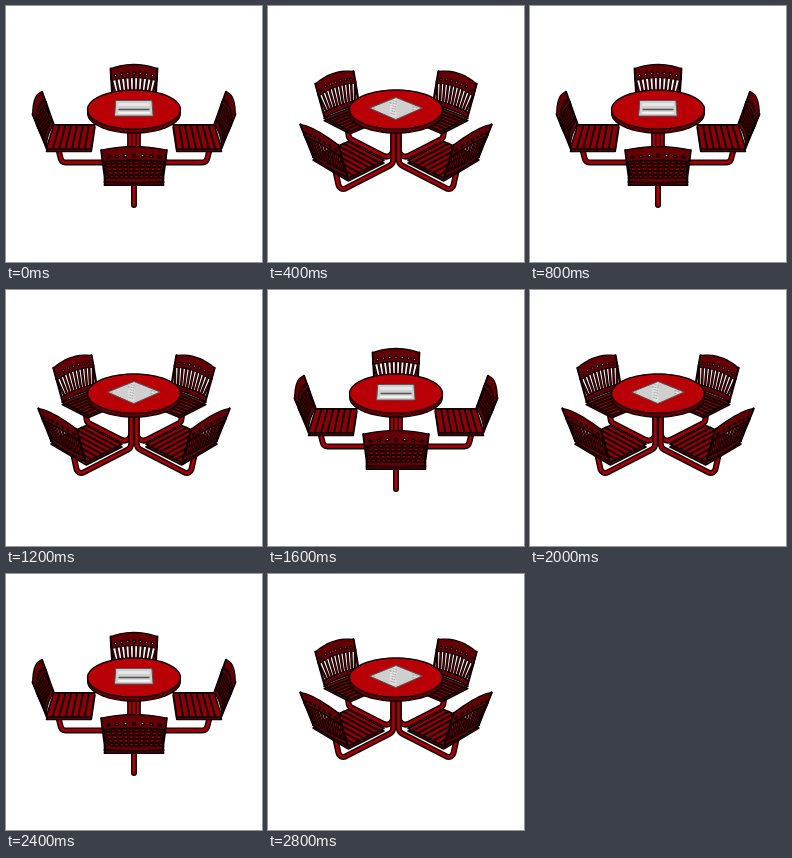
These frames come from a looping animation (256 px wide and 256 px high, 3200 ms). An HTML page with a canvas:

```html
<!DOCTYPE html>
<html lang="en">
<head>
<meta charset="utf-8">
<title>Turning picnic table</title>
<style>
html, body { margin: 0; width: 100%; height: 100%; overflow: hidden; background: #fff; }
canvas { display: block; width: 100vw; height: 100vh; }
</style>
</head>
<body>
<canvas id="stage" width="256" height="256"></canvas>
<script>
const ctx = document.getElementById('stage').getContext('2d');
const STEP = 400, QUARTER = Math.PI / 2;
const DISTANCE = 520, TILT = .42, RISE = Math.sqrt(1 - TILT * TILT);
const INK = '#0c0001', RED = '#b80006', MID = '#8e0006', DARK = '#640005';
const TABLE = 47, PLATE = 18.5;

const lerp = (a, b, t) => a + (b - a) * t;
const range = (n, f) => Array.from({ length: n }, (_, i) => f(i));

// Projects a point at distance r along heading a, s sideways and h above the table.
function project(a, r, s, h) {
  const x = r * Math.sin(a) + s * Math.cos(a);
  const z = r * Math.cos(a) - s * Math.sin(a);
  const k = DISTANCE / (DISTANCE - z * RISE - h * TILT);
  return [128 + k * x, 102 + k * (z * TILT - h * RISE)];
}

function addPath(points, closed) {
  points.forEach(([x, y], i) => i ? ctx.lineTo(x, y) : ctx.moveTo(x, y));
  if (closed) ctx.closePath();
}

function stroke(color, width) {
  ctx.strokeStyle = color;
  ctx.lineWidth = width;
  ctx.stroke();
}

function poly(points, fill, width = 1.4, edge = INK) {
  ctx.beginPath();
  addPath(points, true);
  ctx.fillStyle = fill;
  ctx.fill();
  stroke(edge, width);
}

function line(points, color, width) {
  ctx.beginPath();
  addPath(points);
  stroke(color, width);
}

// A bent pipe from below the seat to the middle and up to the table.
function pipe(a) {
  const [seat, elbow, middle, top] = [
    project(a, 80, 0, -38), project(a, 76, 0, -63),
    project(a, 4, 0, -63), project(a, 4, 0, -4)
  ];
  ctx.beginPath();
  ctx.moveTo(...seat);
  ctx.arcTo(...elbow, ...middle, 5);
  ctx.arcTo(...middle, ...top, 7);
  ctx.lineTo(...top);
  stroke(INK, 6);
  stroke(MID, 3.4);
  stroke(RED, 1);
}

function seat(a) {
  const at = (u, v, h = -32) => project(a, lerp(86, 42, v), u * 26, h);
  const outline = h => [at(-1, 0, h), at(1, 0, h), at(1, 1, h), at(-1, 1, h)];
  poly(outline(-35), DARK, 1.6);
  poly(outline(-32), MID, 1.6);
  for (let i = 1; i < 7; i++) line([at(-1, i / 7), at(1, i / 7)], INK, 2);
}

function back(a) {
  const at = (u, v) => {
    const bulge = 1 - u * u;
    return project(a, lerp(96, 86, v) + 2 * bulge, u * lerp(27, 25, v),
      lerp(6 + 4.5 * bulge, -31, v));
  };
  const edge = v => range(11, i => at(i / 5 - 1, v));
  const band = (v0, v1) => edge(v0).concat(edge(v1).reverse());

  for (let i = 0; i <= 10; i++) {
    const u = i / 5 - 1;
    const slat = [at(u, .3), at(u * .8, .95)];
    line(slat, INK, 2.5);
    line(slat, DARK, .9);
  }
  for (const u of [-1, 1]) line(range(6, i => at(u, i / 5)), INK, 2.4);
  poly(band(.87, 1), DARK);

  // Top rail with real holes punched through it.
  ctx.beginPath();
  addPath(band(0, .36), true);
  for (let i = -3; i <= 3; i++) {
    addPath(range(8, j => {
      const t = j * Math.PI / 4;
      return at(i / 3.7 + .05 * Math.cos(t), .24 + .035 * Math.sin(t));
    }), true);
  }
  ctx.fillStyle = DARK;
  ctx.fill('evenodd');
  stroke(INK, 1.3);
}

function chair(a) {
  const parts = Math.cos(a) > .1 ? [seat, back] : [back, seat];
  parts.forEach(draw => draw(a));
}

function table(turn) {
  const ring = h => range(72, i => project(i * Math.PI / 36, TABLE - .7, 0, h));
  for (let h = -4; h < 0; h++) poly(ring(h), DARK, h > -4 ? .1 : 1.5, h > -4 ? DARK : INK);
  poly(ring(0), RED);

  const at = (u, v) => project(turn, v * PLATE, u * PLATE, 0);
  const bar = (v, color, width) => line([at(-.8, v), at(.8, v)], color, width);
  poly([at(-1, -1), at(1, -1), at(1, 1), at(-1, 1)], '#cfcfcf', 1, '#555');
  if (turn) {
    // Speckled stone look.
    for (let i = 0; i < 50; i++) {
      const [x, y] = at(1.7 * (i * .618 % 1) - .85, 1.7 * (i * .377 % 1) - .85);
      ctx.fillStyle = i % 3 ? '#e6e6e6' : '#a4a4a4';
      ctx.fillRect(x - 1, y - .6, 2, 1.2);
    }
  } else {
    bar(-.45, '#e6e6e6', 3);
    bar(.2, '#555', 1.6);
    bar(.6, '#f4f4f4', 2);
  }
}

function drawSet(turn) {
  const headings = range(4, i => turn + i * QUARTER)
    .sort((a, b) => Math.cos(a) - Math.cos(b));
  const inFront = a => Math.cos(a) > .1;
  headings.forEach(pipe);
  headings.filter(a => !inFront(a)).forEach(chair);
  table(turn);
  headings.filter(inFront).forEach(chair);
}

let shown = -1;
function frame(now) {
  const view = Math.floor(now / STEP) % 2;
  if (view !== shown) {
    shown = view;
    ctx.fillStyle = '#fff';
    ctx.fillRect(0, 0, 256, 256);
    ctx.lineJoin = ctx.lineCap = 'round';
    drawSet(view * QUARTER / 2);
  }
  requestAnimationFrame(frame);
}
frame(0);
</script>
</body>
</html>
```
